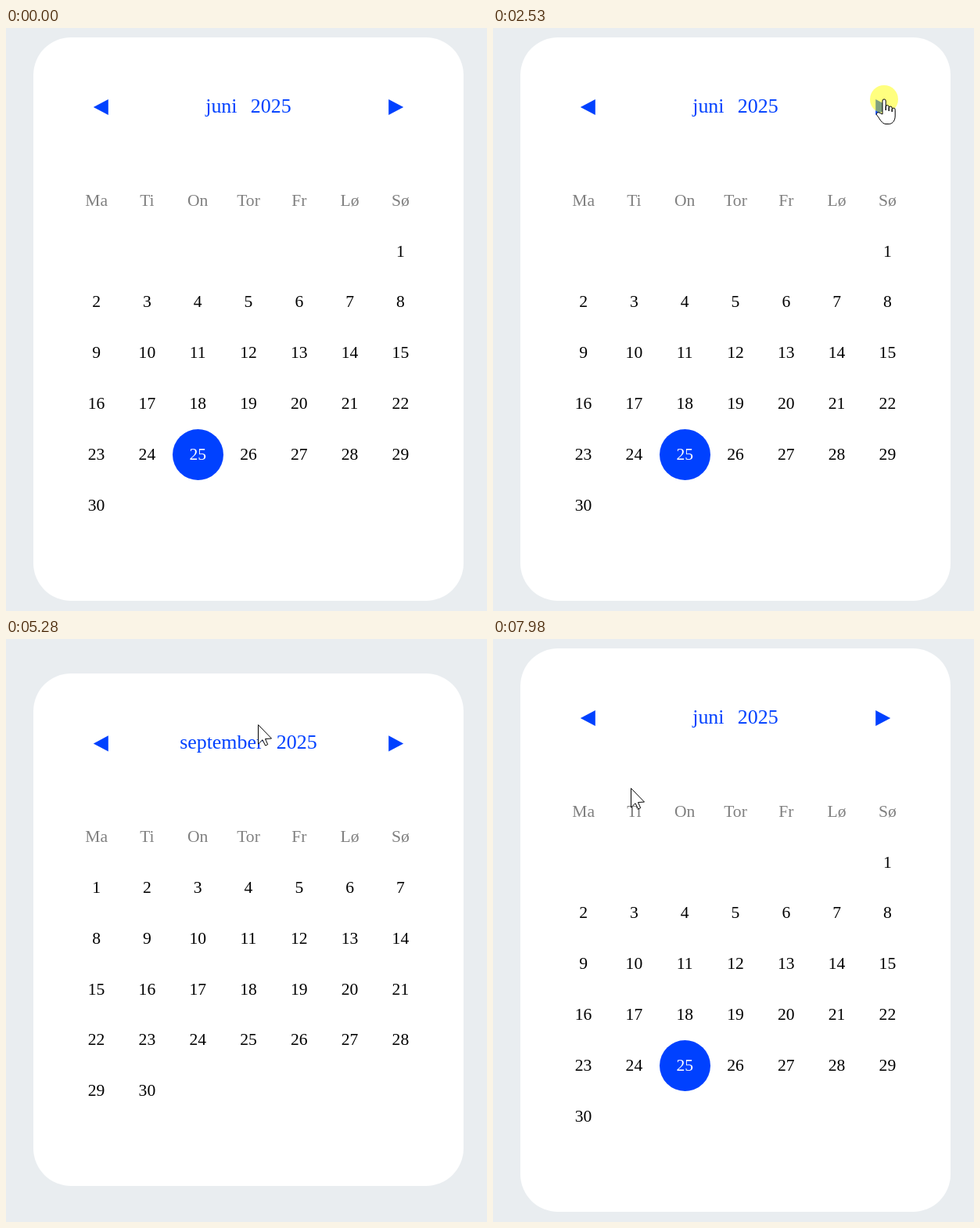
Recreate the animation shown at these times as an HTML page. Size 615 by 744 pixels, loop 8000 ms.

```html
<!DOCTYPE html>
<html lang="da">
<head>
<meta charset="utf-8">
<title>Kalender</title>
<style>
  html, body { margin: 0; width: 100%; height: 100%; overflow: hidden; background: #e9edf0; }
  svg { display: block; width: 615px; height: 744px; }
  text { font: 21.6px "Liberation Serif", "Times New Roman", serif; text-anchor: middle; }
  .title { font-size: 25.92px; fill: #0041ff; }
  .week { fill: #808080; }
  .button, .today { fill: #0041ff; }
  .hover { fill: #ebecf0; }
  .pointer path { fill: #fff; stroke: #000; stroke-linejoin: round; }
</style>
</head>
<body>
<svg id="stage" viewBox="0 0 615 744"></svg>
<script>
const LOOP = 8000, TICK = 69, HOVER_LAG = 140;
const YEAR = 2025, FIRST_MONTH = 5, TODAY = 25;
const CELL = 64.8, MID = 310, BUTTON_X = 188.5;
const WEEK = ['Ma', 'Ti', 'On', 'Tor', 'Fr', 'Lø', 'Sø'];
const NAMES = ['juni', 'juli', 'august', 'september'];

// press and release times
const CLICKS = [[2470, 2540], [3810, 3870], [4600, 4740], [5770, 5840], [6500, 6630], [7230, 7300]];

// pointer strokes: each a curve from a to b, bent towards c
const MOVES = [
  { start: 480, end: 1220, a: [503, 709], c: [347, 663], b: [348, 425] },
  { start: 1290, end: 1780, a: [344, 395], c: [291, 408], b: [467, 130] },
  { start: 2040, end: 2320, a: [474, 124], c: [485, 105], b: [500, 91] },
  { start: 2930, end: 3350, a: [500, 95], c: [498, 115], b: [492, 133] },
  { start: 4940, end: 5700, a: [488, 132], c: [300, 88], b: [134, 128] },
  { start: 7910, end: 7980, a: [150, 152], c: [163, 171], b: [176, 190] }
];

const ARROW = 'M.5.5V25L6 19.7 9.6 27 12.7 25.6 9.5 18.5 17.5 18Z';
const HAND = 'M-2 19V2a2.1 2.1 0 0 1 4.2 0V14V9.4a2 2 0 0 1 4 .6V15V10.8a2 2 0 0 1 4 .6V16V12.9' +
  'a2 2 0 0 1 4 .6V21c0 6-3 10-7.5 10.5H2C-3 31-5 25.5-9.2 20.2c-1.4-3 1.7-4.3 3.8-2.7Z';

const stage = document.getElementById('stage');

function add(parent, tag, attrs, text) {
  const el = document.createElementNS('http://www.w3.org/2000/svg', tag);
  for (const key in attrs) el.setAttribute(key, attrs[key]);
  if (text !== undefined) el.textContent = text;
  parent.appendChild(el);
  return el;
}

const show = (el, on) => el.setAttribute('visibility', on ? 'visible' : 'hidden');
const colX = col => MID + (col - 3) * CELL;

// the card is centred, so a month with five rows starts half a cell lower
function layout(index) {
  const first = (new Date(YEAR, FIRST_MONTH + index, 1).getDay() + 6) % 7;
  const days = new Date(YEAR, FIRST_MONTH + index + 1, 0).getDate();
  const shift = first + days > 35 ? 0 : CELL / 2;
  return { first, days, shift, buttonY: 101 + shift };
}

function cellBox(col, row, shift) {
  const x = Math.round(colX(col - 0.5)), y = Math.round(252.6 + CELL * row + shift);
  const w = Math.round(colX(col + 0.5)) - x;
  const h = Math.round(252.6 + CELL * (row + 1) + shift) - y;
  return { cx: x + w / 2, cy: y + h / 2, rx: w / 2, ry: h / 2 };
}

function buildMonth(name, index) {
  const { first, days, shift, buttonY } = layout(index);
  const g = add(stage, 'g', {});
  const top = Math.round(11.8 + shift), bottom = Math.round(730.8 - shift);
  const baseline = row => Math.round(226.8 + CELL * row + shift);

  add(g, 'rect', { x: 35, y: top, width: 550, height: bottom - top, rx: 48, fill: '#fff' });
  for (const side of [-1, 1]) {
    const base = MID + side * (BUTTON_X - 9.3), tip = MID + side * (BUTTON_X + 9.7);
    add(g, 'path', { class: 'button', d: `M${tip} ${buttonY}L${base} ${buttonY - 10.1}v20.2Z` });
  }
  const title = add(g, 'text', { class: 'title', x: 309.9, y: Math.round(108 + shift) }, name + ' ');
  add(title, 'tspan', { dx: 10.8 }, YEAR);
  WEEK.forEach((day, col) => add(g, 'text', { class: 'week', x: colX(col), y: baseline(0) }, day));

  const cells = [];
  for (let d = 1; d <= days; d++) {
    const n = first + d - 1, col = n % 7, row = Math.floor(n / 7);
    const box = cellBox(col, row, shift), today = index === 0 && d === TODAY;
    const disc = add(g, 'ellipse', { class: today ? 'today' : 'hover', ...box });
    const label = add(g, 'text', { x: colX(col), y: baseline(row + 1) }, d);
    cells.push({ box, today, disc, label });
  }
  return { g, cells };
}

const views = NAMES.map(buildMonth);
const click = add(stage, 'circle', { r: 18, fill: '#ff0', 'fill-opacity': 0.5 });
const pointer = add(stage, 'g', { class: 'pointer' });
const arrow = add(pointer, 'path', { d: ARROW });
const hand = add(pointer, 'path', { d: HAND });

const lastMove = t => MOVES.filter(m => t >= m.start).pop();

function pointerAt(t) {
  const move = lastMove(t);
  if (!move) return null;
  const steps = Math.round((move.end - move.start) / TICK);
  const done = (t - move.start + 5) / (move.end - move.start);
  const u = Math.min(1, Math.floor(done * steps) / steps), v = 1 - u;
  return [0, 1].map(i => Math.round(v * v * move.a[i] + 2 * u * v * move.c[i] + u * u * move.b[i]));
}

// every released click steps one month towards its side
function monthAt(t) {
  return CLICKS.filter(c => t >= c[1])
    .reduce((sum, [press]) => sum + Math.sign(pointerAt(press)[0] - MID), 0);
}

// the pointer only changes its shape while it moves
function isHand(t, [x, y]) {
  const { buttonY } = layout(monthAt(Math.min(t, lastMove(t).end)));
  return Math.abs(Math.abs(x - MID) - BUTTON_X) < 15 && Math.abs(y - buttonY) < 18;
}

const inside = (p, b) => p && Math.hypot(p[0] - b.cx, p[1] - b.cy) < b.rx;

function draw(t) {
  const month = monthAt(t), pos = pointerAt(t), trail = pointerAt(t - HOVER_LAG);
  views.forEach((view, i) => view.g.setAttribute('display', i === month ? 'inline' : 'none'));
  for (const { box, today, disc, label } of views[month].cells) {
    const over = inside(trail, box);
    disc.setAttribute('opacity', today || over ? 1 : 0);
    label.setAttribute('fill', today ? '#fff' : over ? '#1b2348' : '#000');
  }

  const onButton = pos && isHand(t, pos);
  show(arrow, pos && !onButton);
  show(hand, onButton);
  show(click, CLICKS.some(([press, release]) => t >= press && t < release));
  if (pos) {
    const place = `translate(${pos[0]} ${pos[1]})`;
    pointer.setAttribute('transform', place);
    click.setAttribute('transform', place);
  }
}

const begin = performance.now();
function tick() {
  draw((performance.now() - begin) % LOOP);
  requestAnimationFrame(tick);
}
tick();
</script>
</body>
</html>
```
